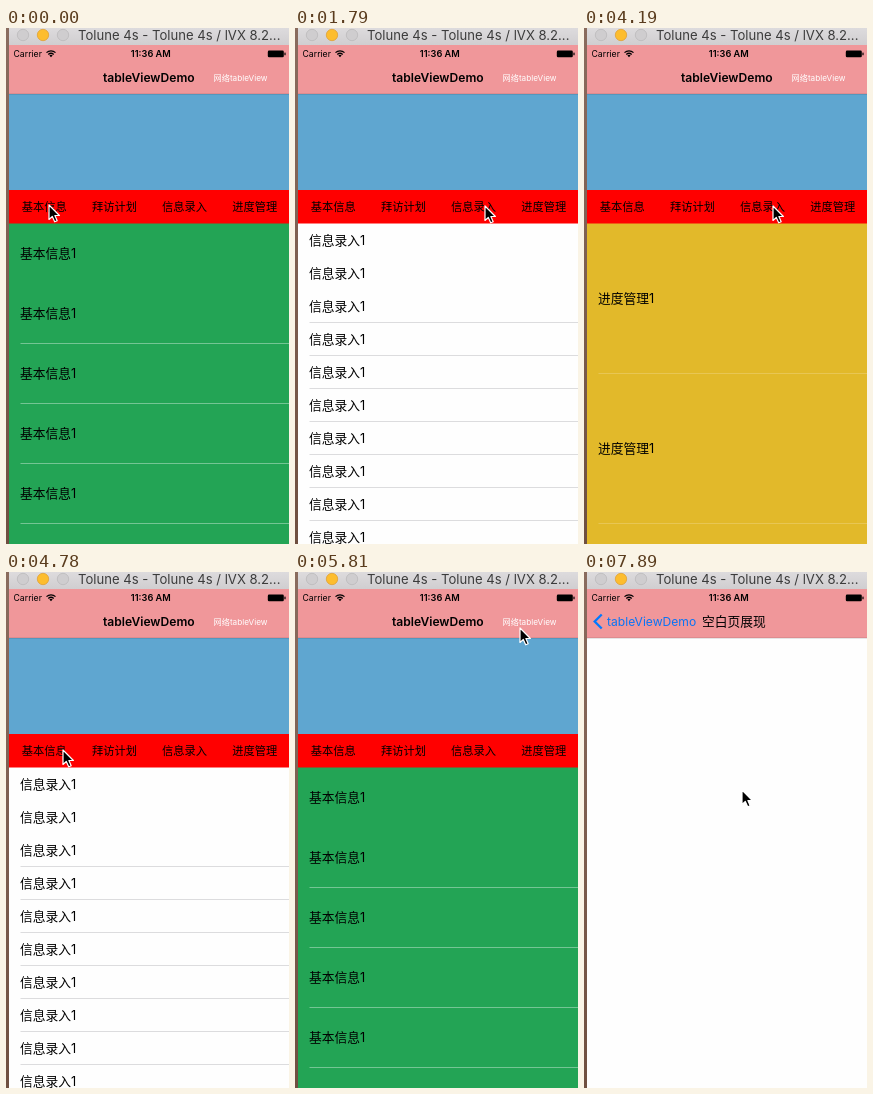
Animation, 283 px wide and 516 px high, one loop 8 s. Source, as an HTML page:

```html
<!DOCTYPE html>
<html lang="zh-CN">
<head>
<meta charset="utf-8">
<title>tableViewDemo</title>
<style>
  @property --page { syntax: "<number>"; inherits: true; initial-value: 0; }
  @property --push { syntax: "<number>"; inherits: true; initial-value: 1; }

  html, body { margin: 0; width: 100%; height: 100%; overflow: hidden; background: #fff; }
  svg {
    display: block; width: 283px; height: 516px;
    font-family: Inter, "Noto Sans CJK SC", "Noto Sans CJK", sans-serif;
    animation: tabs 8s step-end infinite, push 8s step-end infinite;
  }
  text { white-space: pre; }
  .middle { text-anchor: middle; }
  .cell { font-size: 12.75px; }
  .tab { font-size: 11.25px; text-anchor: middle; }
  .bold { font-weight: 600; }

  /* --push runs from 1 (list in view) to 0 (blank page in view) */
  .list { transform: translateX(calc((var(--push) - 1) * 84px)); }
  .shade { opacity: calc(.1 * (1 - var(--push))); }
  .blank { transform: translateX(calc(var(--push) * 280px)); }
  .page { opacity: calc(1 - max(var(--page) - var(--i), var(--i) - var(--page))); }
  .leaving { opacity: calc(var(--push) * var(--push)); }
  .old-title { transform: translateX(calc((var(--push) - 1) * 84px)); }
  .back { opacity: calc(1 - var(--push)); transform: translateX(calc(var(--push) * 84px)); }
  .new-title { opacity: calc(1 - var(--push)); transform: translateX(calc(var(--push) * 186px)); }
  .chevron { opacity: calc(1 - 5 * var(--push)); }
  .notice { animation: dismiss 8s step-end infinite; }
  .cursor { animation: point 8s step-end infinite; }

  /* 1% is 80 ms */
  @keyframes tabs {
    0% { --page: 0; }
    13% { --page: 1; }
    22.375% { --page: 2; }
    39.25% { --page: 3; }
    54.125% { --page: 2; }
    61.625%, 100% { --page: 0; }
  }
  @keyframes push {
    0% { --push: 1; }
    78.125% { --push: .81; }
    80% { --push: .14; }
    81.875% { --push: .013; }
    83.75%, 100% { --push: 0; }
  }
  @keyframes dismiss {
    0% { opacity: 1; }
    96.75% { opacity: .5; }
    98.625%, 100% { opacity: 0; }
  }
  @keyframes point {
    0% { transform: translate(43px, 177px); }
    1.875% { transform: translate(44px, 177px); }
    5.5% { transform: translate(58px, 177px); }
    7.375% { transform: translate(90px, 176px); }
    9.25% { transform: translate(109px, 176px); }
    14.875% { transform: translate(122px, 176px); }
    16.75% { transform: translate(165px, 178px); }
    18.625% { transform: translate(188px, 178px); }
    22.375% { transform: translate(190px, 178px); }
    24.25% { transform: translate(192px, 178px); }
    26.125% { transform: translate(207px, 178px); }
    28% { transform: translate(229px, 178px); }
    29.875% { transform: translate(247px, 177px); }
    31.75% { transform: translate(253px, 177px); }
    46.75% { transform: translate(250px, 177px); }
    48.625% { transform: translate(222px, 178px); }
    50.5% { transform: translate(196px, 178px); }
    52.25% { transform: translate(189px, 178px); }
    56% { transform: translate(165px, 179px); }
    57.875% { transform: translate(95px, 179px); }
    59.75% { transform: translate(57px, 178px); }
    63.375% { transform: translate(68px, 167px); }
    65.25% { transform: translate(118px, 125px); }
    67.125% { transform: translate(175px, 78px); }
    68.875% { transform: translate(212px, 48px); }
    70.75% { transform: translate(224px, 46px); }
    72.625% { transform: translate(225px, 56px); }
    83.75% { transform: translate(217px, 75px); }
    85.625% { transform: translate(192px, 130px); }
    87.5% { transform: translate(166px, 190px); }
    89.25%, 100% { transform: translate(158px, 218px); }
  }
</style>
</head>
<body>
<svg viewBox="0 0 283 516">
  <defs>
    <linearGradient id="desk" x2="0" y2="1">
      <stop stop-color="#8a6c5e"/><stop offset="1" stop-color="#6f4f40"/>
    </linearGradient>
    <linearGradient id="bar" x2="0" y2="1">
      <stop stop-color="#dddbdd"/><stop offset="1" stop-color="#d0ced0"/>
    </linearGradient>
  </defs>

  <g class="list">
    <rect x="3" y="66" width="280" height="96" fill="#5fa6d0"/>
    <g id="page-layer"></g>
    <rect x="3" y="162" width="280" height="33.5" fill="#f00"/>
    <g id="tab-layer"></g>
    <rect class="shade" x="3" y="66" width="280" height="450"/>
  </g>

  <g class="blank">
    <rect x="3" y="66" width="280" height="450" fill="#fefefe"/>
    <g class="notice">
      <path fill="#646464" d="M131 156a8.8 8.8 0 0 1-1.5-17.5a13 13 0 0 1 24.5-5.5a11.5 11.5 0 0 1 3 23Z"/>
      <g fill="#fff">
        <rect x="134.5" y="138.5" width="17" height="4" rx="1.5"/>
        <rect x="134.5" y="143.5" width="17" height="4" rx="1.5"/>
        <rect x="134.5" y="148.5" width="17" height="4" rx="1.5"/>
      </g>
      <path stroke="#646464" d="M147 140.5h2m-2 5h2m-2 5h2"/>
      <circle cx="157.5" cy="133.5" r="7" fill="#e4e4e4" stroke="#646464" stroke-width="1.3"/>
      <path stroke="#555" stroke-width="1.7" d="M157.5 129v5.5m0 1.5v1.8"/>
      <text class="middle" x="143.5" y="181.3" font-size="11.25" fill="#a0a0a0">貌似出了点差错</text>
      <rect x="86.5" y="201.5" width="114" height="34" rx="17" fill="#fff" stroke="#b4b4b4"/>
      <text class="cell middle" x="143" y="223" fill="#5a5a5a">重试</text>
    </g>
  </g>

  <rect width="3" height="516" fill="url(#desk)"/>
  <rect x="3" width="280" height="17" fill="url(#bar)"/>
  <g fill="#cfcdcf" stroke="#bcbabc" stroke-width=".8">
    <circle cx="17" cy="7" r="5.7"/>
    <circle cx="37" cy="7" r="5.7" fill="#fdbd2e" stroke="#e0a136"/>
    <circle cx="57" cy="7" r="5.7"/>
  </g>
  <text x="72" y="12" font-size="13.1" fill="#3c3c3c">Tolune 4s - Tolune 4s / lVX 8.2...</text>

  <rect x="3" y="17" width="280" height="49" fill="#f0979a"/>
  <rect x="3" y="65.7" width="280" height=".7" fill="#000" opacity=".25"/>
  <text x="7.5" y="28.8" font-size="8.7">Carrier</text>
  <g fill="none" stroke="#000" stroke-width="1.3">
    <path d="M40.5 24.6a6.5 6.5 0 0 1 9 0M42.3 26.5a4 4 0 0 1 5.4 0"/>
    <path fill="#000" stroke="none" d="M45 29.3l-1.6-1.7a2.3 2.3 0 0 1 3.2 0Z"/>
  </g>
  <text class="middle bold" x="144.8" y="29" font-size="9.2">11:36 AM</text>
  <rect x="261.8" y="22.6" width="16" height="6.6" rx="1.3"/>
  <rect x="278.4" y="24.6" width="1.2" height="2.6" rx=".5"/>

  <g class="leaving">
    <text class="old-title bold" x="97" y="54" font-size="12.1">tableViewDemo</text>
    <text x="207.5" y="52.8" font-size="8.2" fill="#fff">网络tableView</text>
  </g>
  <path class="chevron" d="M17.7 42.5L10.7 49.5L17.7 56.5" fill="none" stroke="#007aff" stroke-width="2.3"/>
  <text class="back" x="23" y="54" font-size="12.1" fill="#0a74f5">tableViewDemo</text>
  <text class="new-title cell" x="118" y="54.3" font-weight="500">空白页展现</text>

  <path class="cursor" d="M0 0V14.5L3.3 11.5L5.7 16.8L8.2 15.7L5.9 10.5H10.4Z"
        stroke="#fff" stroke-width="1.2" stroke-linejoin="round"/>
</svg>

<script>
  const listTop = 195, listBottom = 516;
  const pages = [
    { name: "基本信息", height: 60, fill: "#23a455", line: "#74c594" },
    { name: "拜访计划", height: 75, fill: "#fefefe", line: "#dcdcde" },
    { name: "信息录入", height: 33, fill: "#fefefe", line: "#dcdcde" },
    { name: "进度管理", height: 150, fill: "#e2b92a", line: "#e8c654" },
  ];
  const pageLayer = document.getElementById("page-layer");
  const tabLayer = document.getElementById("tab-layer");

  function add(parent, tag, attributes, content = "") {
    const node = document.createElementNS("http://www.w3.org/2000/svg", tag);
    for (const [key, value] of Object.entries(attributes)) node.setAttribute(key, value);
    node.textContent = content;
    return parent.appendChild(node);
  }

  pages.forEach(({ name, height, fill, line }, index) => {
    const page = add(pageLayer, "g", { class: "page", style: `--i: ${index}` });
    add(page, "rect", { x: 3, y: listTop, width: 280, height: listBottom - listTop, fill });
    for (let y = listTop; y < listBottom; y += height) {
      const end = y + height;
      add(page, "text", { class: "cell", x: 14, y: y + height / 2 + 5 }, name + "1");
      // the upper rows show no separator
      if (end > 290) add(page, "rect", { x: 14.5, y: end, width: 268.5, height: 1, fill: line });
    }
    add(tabLayer, "text", { class: "tab", x: 38.2 + index * 70.2, y: 183.2 }, name);
  });
</script>
</body>
</html>
```
